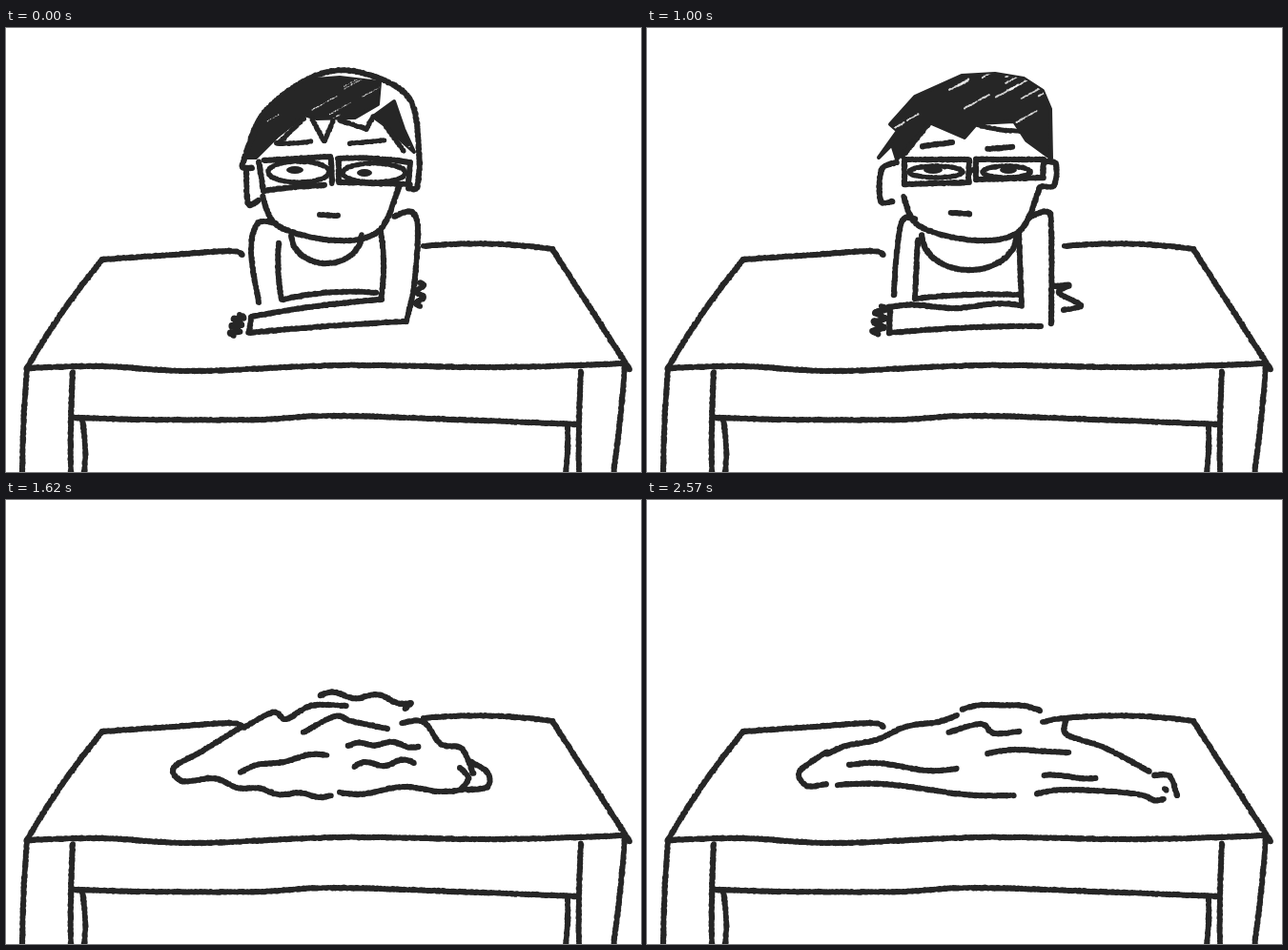
These frames come from a looping animation (666 px wide and 466 px high, 2.64 s). An HTML page with a canvas:

```html
<!DOCTYPE html>
<html lang="en">
<head>
<meta charset="utf-8">
<title>Melting at the desk</title>
<style>
html, body { margin: 0; width: 100%; height: 100%; overflow: hidden; background: #fff; }
canvas { display: block; }
</style>
</head>
<body>
<canvas id="stage" width="666" height="466"></canvas>
<script>
const ctx = document.getElementById('stage').getContext('2d');
const INK = '#262626', LOOP = 2640, MID = 334, BASE = 316;
const still = { sx: 1, sy: 1, boil: 0 };
let seed = 1, warp = still, nib = 5.8;

function rand() {
  seed = (seed * 16807) % 2147483647;
  return seed / 2147483647;
}
const shake = size => (rand() - .5) * size;

// Pairs of numbers to points, squashed towards the desk
function place(nums) {
  const pts = [];
  for (let i = 0; i < nums.length; i += 2) {
    pts.push([
      MID + (nums[i] - MID) * warp.sx + shake(warp.boil),
      BASE + (nums[i + 1] - BASE) * warp.sy + shake(warp.boil)
    ]);
  }
  return pts;
}

function brush(pts, width = nib, color = INK) {
  ctx.fillStyle = color;
  ctx.beginPath();
  for (const [x, y] of pts) {
    const px = x + shake(.7), py = y + shake(.7), r = width / 2 + shake(.6);
    ctx.moveTo(px + r, py);
    ctx.arc(px, py, r, 0, 7);
  }
  ctx.fill();
}

// Catmull-Rom through a few key points
function spline(pts) {
  const out = [], last = pts.length - 1;
  const mix = (a, b, c, d, t) =>
    b + .5 * t * (c - a + t * (2 * a - 5 * b + 4 * c - d + t * (3 * (b - c) + d - a)));
  for (let i = 0; i < last; i++) {
    const a = pts[Math.max(0, i - 1)], b = pts[i], c = pts[i + 1], d = pts[Math.min(last, i + 2)];
    const n = Math.ceil(Math.hypot(c[0] - b[0], c[1] - b[1])) + 1;
    for (let k = 0; k <= n; k++) out.push([0, 1].map(j => mix(a[j], b[j], c[j], d[j], k / n)));
  }
  return out;
}
const path = (...nums) => brush(spline(place(nums)));

// Line that bends to its left side and ripples
function bow(x0, y0, x1, y1, bend = 0, ripple = 0, cycles = 1) {
  const [a, b] = place([x0, y0, x1, y1]);
  const dx = b[0] - a[0], dy = b[1] - a[1], len = Math.hypot(dx, dy);
  const n = Math.ceil(len + 4 * cycles * Math.abs(ripple)), pts = [];
  for (let i = 0; i <= n; i++) {
    const t = i / n;
    const off = bend * 4 * t * (1 - t) + ripple * Math.sin(2 * Math.PI * cycles * t);
    pts.push([a[0] + dx * t + off * dy / len, a[1] + dy * t - off * dx / len]);
  }
  brush(pts);
}

function arc(x, y, rx, ry, turn = 2) {
  const nums = [], n = 8 * turn;
  for (let i = 0; i <= n; i++) {
    const a = i / 8 * Math.PI;
    nums.push(x + rx * Math.cos(a), y + ry * Math.sin(a));
  }
  path(...nums);
}

function pupil(x, y, rx, ry) {
  const [[px, py]] = place([x, y]);
  ctx.fillStyle = INK;
  ctx.beginPath();
  ctx.ellipse(px, py, rx, ry * warp.sy, 0, 0, 7);
  ctx.fill();
}

// Solid hair with random pale gaps between the pen strokes
function hair(gaps, width, ...nums) {
  const pts = place(nums), shape = new Path2D();
  pts.forEach(p => shape.lineTo(...p));
  shape.closePath();
  ctx.fillStyle = ctx.strokeStyle = INK;
  ctx.lineWidth = 4;
  ctx.lineJoin = 'round';
  ctx.fill(shape);
  ctx.stroke(shape);
  const xs = pts.map(p => p[0]), ys = pts.map(p => p[1]);
  const left = Math.min(...xs), top = Math.min(...ys);
  const w = Math.max(...xs) - left, h = Math.max(...ys) - top;
  ctx.save();
  ctx.clip(shape);
  for (let i = 0; i < gaps; i++) {
    const x = left + rand() * w, y = top + rand() * h, len = 10 + rand() * 18;
    brush(spline([[x, y], [x + len, y - len * .55]]), width, 'rgba(255,255,255,.8)');
  }
  ctx.restore();
}

function table() {
  path(101,243, 175,238, 235,234, 248,238);
  bow(101,243, 22,357, -3);
  path(22,357, 100,355, 200,360, 350,354, 500,356, 600,354, 648,352);
  bow(438,229, 573,232, 4);
  bow(573,232, 654,358);
  path(71,409, 150,411, 265,411, 345,407, 500,412, 598,416);
  bow(22,357, 17,468, -1);
  bow(70,361, 68,468, -1);
  bow(80,412, 82,468, 2);
  bow(649,355, 637,468, 1);
  bow(603,360, 601,468, -1);
  bow(589,418, 587,468, 1);
}

const chin = () => path(269,177, 286,208, 345,223, 391,213, 412,167);

function awake() {
  path(249,140, 270,90, 320,52, 368,46, 423,74, 434,142);
  hair(14, 1, 251,136, 268,92, 312,55, 350,52, 392,57, 390,80, 366,94, 326,95, 313,91, 284,114, 262,136);
  hair(3, 1, 385,93, 407,77, 417,106, 428,130, 396,101);
  // fringe and brows
  nib = 5;
  bow(312,95, 286,121);
  bow(321,96, 334,119);
  bow(334,119, 343,98);
  bow(350,97, 378,106);
  bow(378,106, 385,93);
  bow(399,104, 417,129);
  bow(284,121, 320,119, -1);
  bow(361,121, 397,118);
  nib = 5.8;
  // ears and face
  path(249,140, 248,146, 258,147);
  path(252,150, 254,184, 265,181);
  path(434,142, 431,167, 422,168);
  chin();
  bow(329,196, 348,197);
  // glasses
  bow(270,139, 340,135);
  bow(265,140, 270,171);
  bow(270,171, 334,165, 1);
  bow(341,137, 342,163);
  bow(349,137, 349,162);
  bow(348,137, 424,141, 2);
  bow(424,141, 422,163);
  bow(350,162, 424,164);
  nib = 5;
  arc(307,151, 32, 11);
  arc(386,152, 33, 10);
  nib = 5.8;
  pupil(303,149, 9, 4);
  pupil(376,152, 8, 4);
  // body
  arc(336,217, 37, 30, 1);
  path(283,205, 264,205, 257,235, 265,288);
  bow(286,226, 289,285, -2);
  bow(291,285, 388,278, 4);
  path(407,198, 425,193, 432,212, 428,270, 420,308);
  bow(393,213, 393,285, 3);
  bow(257,303, 394,285, 2);
  bow(254,320, 419,308, 1);
  bow(257,303, 255,320);
  bow(245,301, 239,323, 0, 5, 3);
  bow(434,267, 434,292, 0, 4, 2);
}

function drowsy() {
  hair(24, 1.8, 243,136, 263,108, 255,101, 281,72, 330,50, 365,48, 395,53, 415,66, 423,85, 424,137,
    398,118, 385,98, 346,100, 333,115, 296,99, 262,138, 257,122);
  nib = 5;
  bow(345,101, 392,108, -2);
  bow(296,100, 268,135);
  // ears, brows, face
  nib = 5.8;
  path(262,141, 246,149, 245,181, 257,182);
  path(418,140, 429,143, 427,165, 414,166);
  bow(289,124, 320,120);
  bow(357,127, 383,125);
  chin();
  bow(319,194, 338,195);
  // glasses
  for (const [x, w, h] of [[270, 68, 26], [345, 71, 21]]) {
    bow(x, 138, x + w, 138);
    bow(x, 138, x, 138 + h);
    bow(x + w, 139, x + w - 1, 136 + h);
    bow(x, 138 + h, x + w, 136 + h);
  }
  bow(338,149, 345,149);
  nib = 5;
  arc(303,151, 28, 6);
  arc(377,151, 25, 6);
  nib = 5.8;
  pupil(300,149, 10, 4);
  pupil(379,149, 9, 4);
  // body
  arc(338,217, 50, 37, 1);
  path(281,200, 268,202, 262,235, 259,280);
  bow(284,222, 281,284);
  bow(281,284, 390,280, 2);
  path(400,199, 420,193, 424,212, 424,310);
  bow(390,215, 393,292);
  bow(253,293, 392,291, 0, 2, 1.5);
  bow(255,320, 413,313, 2);
  bow(255,294, 254,320);
  bow(246,292, 242,321, 0, 6, 3);
  path(427,271, 443,270, 432,278, 455,291, 437,296);
}

function slumped() {
  // hair
  path(275,206, 279,188, 296,162, 335,139, 368,145, 390,176, 416,228);
  bow(276,203, 412,224, 14);
  const scribble = [];
  for (let i = 0; i < 20; i++) {
    const u = i / 19, up = i % 2;
    scribble.push(280 + u * 118 + up * 12, up ? 154 + 170 * (u - .4) ** 2 : 196 + 14 * u * u + shake(8));
  }
  path(...scribble);
  bow(318,188, 344,156);
  bow(274,206, 282,221, -2);
  // glasses and face
  bow(281,217, 328,227, 2);
  bow(283,213, 326,224, 1);
  path(285,226, 279,238, 298,248, 326,244, 334,234);
  arc(360,236, 21, 13);
  bow(346,235, 379,236, 2);
  pupil(315,235, 8, 4);
  pupil(355,237, 9, 4);
  pupil(397,230, 6, 9);
  bow(320,257, 337,258, 1);
  path(282,251, 298,269, 330,275, 368,264, 390,236);
  // arms
  path(262,234, 230,258, 190,281, 180,300);
  path(199,290, 191,303, 215,319, 242,309);
  path(246,295, 223,292, 228,284, 262,280);
  bow(234,298, 223,314, -4);
  bow(276,253, 251,279, -2);
  path(270,257, 272,274, 300,280, 328,283);
  bow(347,266, 343,277);
  bow(345,281, 388,281, 5);
  path(252,303, 260,309, 320,302, 385,302, 411,290);
  path(400,240, 406,262, 399,280, 404,293);
}

function heap() {
  bow(330,205, 425,213, 3, 3, 2);
  bow(425,213, 419,219);
  path(249,239, 280,223, 294,230, 320,216, 357,216);
  path(312,244, 345,227, 362,232, 400,240);
  path(247,238, 205,264, 176,281, 185,295, 212,292);
  bow(212,292, 341,310, -5, 2, 3);
  bow(246,286, 337,268, 4, 2, 1.5);
  bow(359,258, 432,259, 3, 2, 2);
  bow(365,280, 428,276, 2, 3, 1.5);
  bow(350,307, 482,303, 1, -3, 1.5);
  path(415,234, 438,233, 456,256, 478,261, 490,287);
  path(476,281, 485,292, 478,303);
  path(488,275, 505,286, 505,301, 484,304);
}

function puddle() {
  path(189,264, 160,285, 168,300, 188,298);
  bow(189,267, 325,226, 2, 2, 2);
  bow(331,220, 412,221, 6, 1, 1.5);
  path(316,244, 350,235, 364,245, 390,243);
  bow(212,278, 325,282, 0, 3);
  bow(357,266, 442,265, 3, 1);
  bow(416,289, 471,292, 0, 1);
  bow(200,299, 385,310, 1, 3);
  path(409,308, 440,304, 510,308, 532,315, 542,314);
  path(415,233, 438,230, 440,246, 480,260, 527,285);
  path(532,289, 548,290, 556,310);
  bow(543,303, 545,305);
}

// Each act redraws its pose at a fixed beat
const cues = [];
function act(pose, from, to, beat, shape) {
  for (let t = from, i = 0; t <= to; t += beat, i++) cues.push({ ...still, start: t, pose, ...shape(t, i) });
}
const swell = (t, i) => ({ sx: 1 + .015 * Math.abs(i - 1), sy: 1 + .04 * Math.abs(i - 1), boil: 1.5 * Math.abs(i - 1) });

act(awake, 0, 700, 100, (t, i) => ({ boil: i % 2 * 2 }));
act(drowsy, 800, 1200, 100, (t, i) => ({ sy: 1 - .1 * Math.max(0, (t - 1000) / 200) ** 2, boil: Math.abs(i - 2) }));
act(slumped, 1270, 1480, 70, t => ({ sx: 1 + (t - 1340) * .0009, sy: 1 - (t - 1340) * .0019 }));
act(heap, 1550, 1760, 70, t => ({ sx: 1 + (t - 1620) * .00085, sy: 1 - (t - 1620) * .0004 }));
act(puddle, 1830, 1970, 70, swell);
act(puddle, 2070, 2270, 100, swell);
act(puddle, 2570, 2570, 70, () => still);

function draw(cue) {
  ctx.fillStyle = '#fff';
  ctx.fillRect(0, 0, 666, 466);
  warp = still;
  seed = 4711;
  table();
  warp = cue;
  seed = cue.boil ? 900 + cue.start : 77;
  cue.pose();
}

const origin = performance.now();
let shown = null;
function tick() {
  const t = (performance.now() - origin) % LOOP;
  const now = cues.findLast(c => c.start <= t) || cues[0];
  if (now !== shown) draw(shown = now);
  requestAnimationFrame(tick);
}
tick();
</script>
</body>
</html>
```
